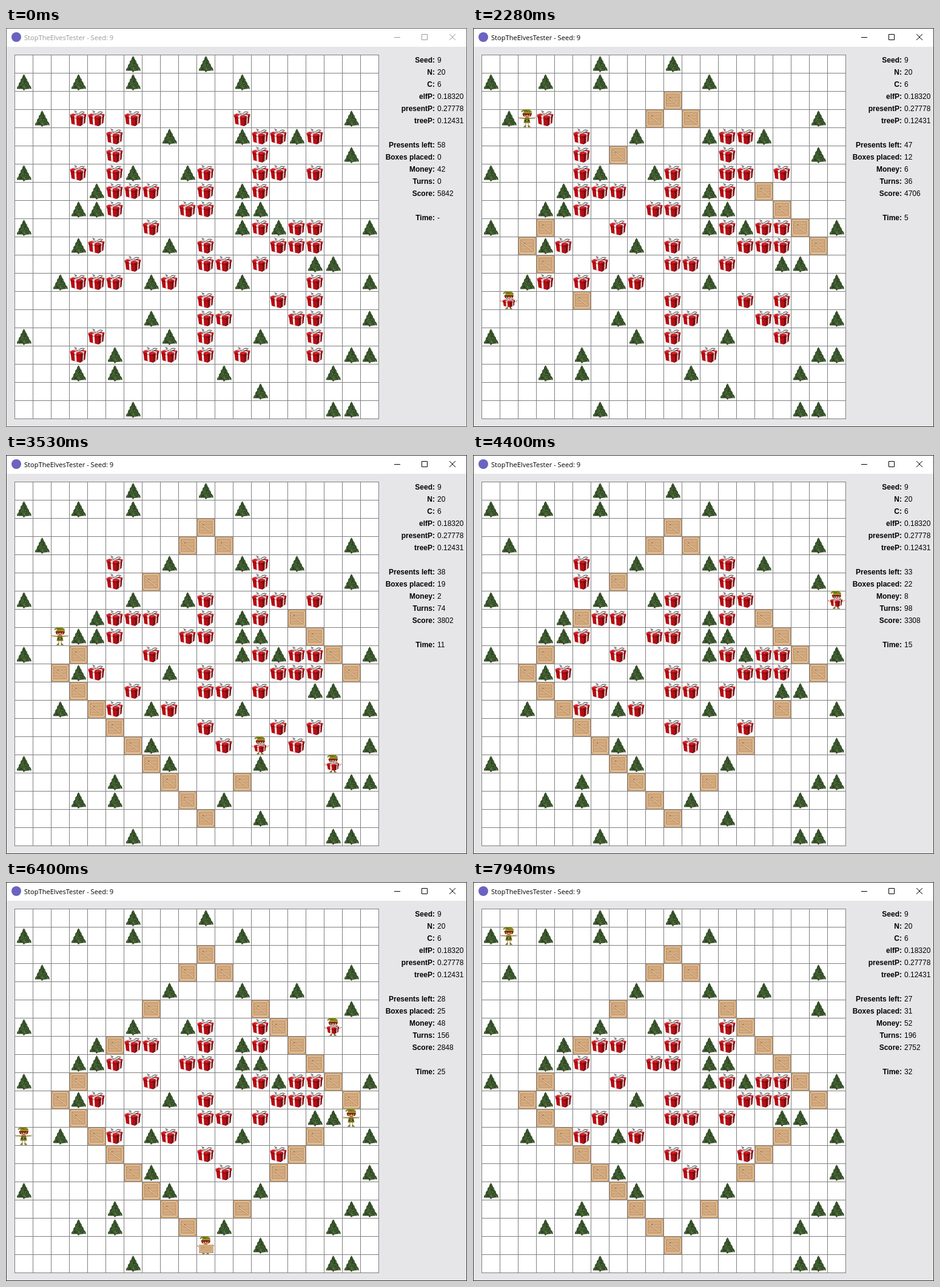
An HTML page with a canvas that plays this animation: 760x658 px, repeating every 7.99 s.

```html
<!DOCTYPE html>
<html lang="en">
<head>
<meta charset="utf-8">
<title>StopTheElvesTester</title>
<style>
  html, body { margin: 0; width: 760px; height: 658px; overflow: hidden; background: #e6e6e8; }
  svg, canvas { position: absolute; left: 0; top: 0; }
  #board { left: 14px; top: 44px; }
  #window { --ink: #999; --edge: #666; }
  #window.waking { --ink: #555; --edge: #4a4a4a; }
  #window.active { --ink: #000; --edge: #383838; }
  .title { font: 11.1px "Open Sans", sans-serif; fill: var(--ink); }
  .buttons { stroke: var(--ink); fill: none; }
  .edge { stroke: var(--edge); fill: none; }
  #panel { font: 12px "Liberation Sans", Arial, sans-serif; }
  .label { font-weight: bold; text-anchor: end; }
</style>
</head>
<body>
<svg id="window" width="760" height="658">
  <rect width="760" height="31" fill="#fff"/>
  <rect class="edge" x=".5" y=".5" width="759" height="657"/>
  <circle cx="17" cy="15" r="8" fill="#6a63c0"/>
  <text class="title" x="30" y="20">StopTheElvesTester - Seed: 9</text>
  <g class="buttons">
    <path d="M640 15.5h10M685.5 10.5h9v9h-9z"/>
    <path d="M731 10l10 10M741 10l-10 10"/>
  </g>
  <g id="panel"></g>
</svg>
<canvas id="board" width="601" height="601"></canvas>
<svg width="760" height="658">
  <path id="cursor" d="M.5.5V16.5L4.2 13 6.6 18.5 9 17.5 6.6 12H11.5Z" fill="#fff" stroke="#000"/>
</svg>
<script>
const N = 20, CELL = 30, LOOP = 7990;

const MAP = [
  "......T...T.........",
  "T..T..T.....T.......",
  "....................",
  ".T.PP.P.....P.....T.",
  ".....P..T...TPPTP...",
  ".....P.......P....T.",
  "T..P.PT..TP..PP.P...",
  "....TPPP..P.TP......",
  "...TTP...PP.TT......",
  "T......P....TPTPP..T",
  "...TP...T.P...PPP...",
  "......P...PP.P..TT..",
  "..TPPP.TP...T...P..T",
  "..........P...P.P...",
  ".......T..PP...PP..T",
  "T...P...T.P..T..P...",
  "...P.T.PP.P.P...P.TT",
  "...T.T.....T.....T..",
  ".............T......",
  "......T..........TT.",
].join("");

// turn placed, column, row
const CRATES = [
  [1, 10, 2], [2, 9, 3], [3, 11, 3], [4, 7, 5], [5, 15, 7], [6, 16, 8], [7, 17, 9], [8, 18, 10], [12, 3, 9],
  [18, 3, 11], [24, 2, 10], [30, 5, 13],
  [37, 6, 14], [42, 7, 15], [48, 8, 16], [54, 12, 16], [60, 4, 12], [66, 9, 17], [72, 10, 18],
  [83, 5, 7], [88, 16, 12], [96, 14, 14], [101, 15, 13],
  [145, 13, 5], [155, 14, 6],
].map(([turn, x, y]) => ({ turn, cell: at(x, y) }));

// ms, turn, elapsed seconds
const PACE = [
  [1030, 1, 0], [1480, 14, 2], [2280, 36, 5], [3530, 74, 11],
  [5280, 124, 20], [6400, 156, 25], [7940, 196, 32], [9480, 236, 39],
];
const FRAME = 45.7;

function at(x, y) { return y * N + x; }

const cells = [...MAP].map((_, i) => i);
const isEdge = c => c < N || c >= N * (N - 1) || c % N === 0 || c % N === N - 1;
const neighbours = c => [
  c % N < N - 1 ? c + 1 : -1, c + N, c % N ? c - 1 : -1, c - N,
].filter(n => n >= 0 && n < N * N);

// Shortest walk to a cell, or to the nearest edge when no goal is given
function walk(from, goal, free) {
  const open = c => c === from || c === goal || free(c);
  const queue = cells.filter(c => goal === undefined ? isEdge(c) && open(c) : c === goal);
  const dist = {};
  queue.forEach(c => dist[c] = 0);
  for (const c of queue) {
    for (const n of neighbours(c)) {
      if (n in dist || !open(n)) continue;
      dist[n] = dist[c] + 1;
      queue.push(n);
    }
  }
  const path = [from];
  for (let c = from; dist[c] > 0;) {
    c = neighbours(c).find(n => dist[n] === dist[c] - 1);
    path.push(c);
  }
  return path;
}

const elves = [];

// An elf stands on `via` (or on its target) at the given turn
function elf(turn, target, via = target, out) {
  target = at(...target);
  via = at(...via);
  const taken = new Set(elves.map(e => e.target));
  const free = c => MAP[c] !== "T" && !(MAP[c] === "P" && !taken.has(c))
    && !CRATES.some(k => k.cell === c && k.turn <= turn);
  const enter = walk(via, undefined, free).reverse();
  const reach = walk(via, target, free);
  const leave = out
    ? [...walk(target, at(...out), free), ...walk(at(...out), undefined, free).slice(1)]
    : walk(target, undefined, free);
  const path = [...enter, ...reach.slice(1), ...leave.slice(1)];
  const start = turn - enter.length + 1;
  elves.push({
    target, path, start,
    grab: turn + reach.length - 1,
    gone: start + path.length,
    gift: MAP[target] === "P" && !taken.has(target),
  });
}

elf(6, [6, 3]);
elf(6, [16, 12]);
elf(12, [3, 16]);
elf(13, [16, 16]);
elf(14, [4, 15]);
elf(14, [8, 16]);
elf(14, [7, 16], [6, 18]);
elf(14, [16, 4], [17, 1]);
elf(20, [3, 6]);
elf(24, [4, 3]);
elf(26, [12, 3]);
elf(32, [4, 12]);
elf(36, [3, 3], [2, 3]);
elf(42, [12, 16]);
elf(44, [10, 16]);
elf(45, [14, 4]);
elf(46, [3, 12]);
elf(50, [16, 15]);
elf(52, [5, 6]);
elf(55, [10, 15]);
elf(69, [10, 14], undefined, [13, 14]);
elf(72, [16, 14], undefined, [17, 15]);
elf(74, [5, 7], [2, 8]);
elf(84, [16, 13]);
elf(92, [15, 14]);
elf(95, [16, 6]);
elf(106, [5, 4]);
elf(113, [5, 5]);
elf(120, [13, 4], [0, 2], [16, 4]);
elf(120, [13, 5], [0, 5], [16, 5]);
elf(153, [14, 6]);
elf(156, [10, 18]);
elf(156, [18, 10], [18, 11]);
elf(156, [2, 10], [0, 12]);
elf(171, [12, 16]);
elf(176, [15, 13]);
elf(186, [10, 18]);
elf(196, [9, 3], [1, 1]);

// --- sprites, drawn on a 30 px cell ---
function bake(paint) {
  const canvas = document.createElement("canvas");
  canvas.width = canvas.height = CELL;
  paint(canvas.getContext("2d"));
  return canvas;
}
function fill(g, color, d) {
  g.fillStyle = color;
  g.fill(new Path2D(d));
}
function line(g, color, width, d) {
  g.strokeStyle = color;
  g.lineWidth = width;
  g.stroke(new Path2D(d));
}

const tree = bake(g => {
  let seed = 7;
  const rnd = () => (seed = seed * 16807 % 2147483647) / 2147483647;
  fill(g, "#5b4630", "M14 24h3v4.5h-3z");
  fill(g, "#36512a", "M15.5 2L18 6 18.500 8 21 11 21 13 24 17 24 19 27 22.500 28 26 22 26.500 18 27 12 26.500 4 26.500 4 24 7 20 7 17.500 10 14 10 11 13 8 13 6Z");
  const tones = ["#1f3517", "#28401d", "#4b6a38", "#5d7c45", "#76925c"];
  for (let i = 0; i < 95; i++) {
    const y = 4 + 21 * Math.sqrt(rnd());
    const x = 15.700 + (rnd() * 2 - 1) * (y - 2) * .46;
    const lean = (x - 15.700) * .15;
    line(g, tones[i % 5], .8, `M${x} ${y}l${lean} 1.700`);
  }
});

const gift = bake(g => {
  fill(g, "#b80c12", "M2.500 12L18.500 15.500 18.500 28 4 24Z");
  fill(g, "#86080d", "M18.500 15.500L27.500 11 26.500 22.500 18.500 28Z");
  fill(g, "#cc1a20", "M1.500 9L10 5.500 28.500 8 19 13Z");
  fill(g, "#c41017", "M1.500 9L19 13 19 16.500 2 12.500Z");
  fill(g, "#9c0b10", "M19 13L28.500 8 28 11.500 19 16.500Z");
  fill(g, "#f4f0f0", "M8.500 10.500L11.800 11.300 12.500 26.300 9.500 25.400Z");
  fill(g, "#e2d8d8", "M22.800 11L25 9.800 24.200 24 22.300 25.400Z");
  fill(g, "#f2eeee", "M8.500 10.600L19.500 6.500 22 7 11.800 11.300ZM6 7.300L8.500 6.200 25 9.800 22.800 11Z");
  line(g, "#570508", .6, "M2 12.700L18.800 16.500 28 11.700M18.700 13v15");
  fill(g, "#f5f5f5", "M15 8C9 8 7 4 9 2.800 11.500 1.500 14 4 15.500 7 17 3 22 1 25 2.500 26.500 5 21 8.500 15 8Z");
  line(g, "#222", .9, "M15 8C10 7 9.500 4.500 11 4M16 7.500C18 4.500 22 3.500 24 4.500M17 8.500C20 8.500 24 7 25.500 4M8.500 2.500L13 4.500");
  line(g, "#777", .7, "M15 8L12 10M16 8L20 10");
});

const crate = bake(g => {
  fill(g, "#d4ab80", "M1 1h29v29h-29z");
  line(g, "#c3966a", .7, "M4 10.500h23M4 15.500h23M4 20.500h23");
  fill(g, "#dfbb92", "M1 1h29v4h-29zM1 25h29v5h-29zM1 5h3.500v20h-3.500zM26 5h4v20h-4z");
  line(g, "#dcb78c", 3.500, "M5.500 8L25.500 23");
  line(g, "#b3865c", .8, "M5 6.500L26 22M4.500 9.500L24 24.500M4.500 5h21.500v20h-21.500z");
  line(g, "#bd9268", 1, "M1.500 1.500h28v28h-28z");
  fill(g, "#8c643f", "M10 10h2v1.500h-2zM2.200 2.500h1v1h-1zM27.500 2.500h1v1h-1zM2.200 27h1v1h-1zM27.500 27h1v1h-1z");
});

function paintElf(g, loot) {
  const skin = "#dc9f70", olive = "#777b20";
  line(g, skin, 1.500, "M13 22L12.500 27M17 22L17.500 27");
  fill(g, "#6a6c1a", "M13.500 26v3.500h-4.500l1-1.500zM16.500 26v3.500h4.500l-1-1.500z");
  line(g, olive, 1.700, loot ? "M12 15L5 18M18 15L25 18" : "M12 15L4 14.500M18 15L26 14.500");
  line(g, skin, 1.500, loot ? "M1 15L4 18M29 15L26 18" : "M1 13.500L4 14.500M29 13.500L26 14.500M2 16L4 14.500M28 16L26 14.500");
  fill(g, "#697020", "M11.500 13.500h7l2 9h-11z");
  fill(g, "#3c3210", "M10.800 18h8.400v1.500h-8.400z");
  fill(g, "#cdb333", "M14 18h2v1.500h-2z");
  fill(g, "#8d1c16", "M7.500 8C8 3.500 22.500 3.500 23 8L21 12H9.500Z");
  fill(g, skin, "M10.500 8.500C12 6.500 18.500 6.500 20 8.500 20 12 18 14.500 15.200 14.500 12.500 14.500 10.500 12 10.500 8.500Z");
  fill(g, "#7c1512", "M9.500 6.500L21.500 6.500 19 9 11 9Z");
  fill(g, "#241510", "M12.300 9.300h1.600v1.400h-1.600zM16.500 9.300h1.600v1.400h-1.600z");
  fill(g, "#b63232", "M13.200 12.200h4v1h-4z");
  fill(g, "#83841f", "M5.500 3L9 .5 18 0 22.500 3 23 6.500 9 6.500 10 3 6 5Z");
  line(g, "#b9ad39", 1, "M9 6L23 6");
  line(g, "#4d5216", .8, "M11 2L16 3.500");
  if (loot === gift) g.drawImage(gift, 3.500, 9.500, 23, 18.500);
  if (loot === crate) g.drawImage(crate, 3.500, 13.500, 24, 14);
}
const freeElf = bake(g => paintElf(g));
const giftElf = bake(g => paintElf(g, gift));
const crateElf = bake(g => paintElf(g, crate));

// --- side panel ---
const panel = document.getElementById("panel");
function text(x, y, content, cls) {
  const node = document.createElementNS("http://www.w3.org/2000/svg", "text");
  node.setAttribute("x", x);
  node.setAttribute("y", y);
  if (cls) node.setAttribute("class", cls);
  node.textContent = content;
  return panel.appendChild(node);
}
const values = {};
[
  ["Seed", "9"], ["N", "20"], ["C", "6"], ["elfP", "0.18320"], ["presentP", "0.27778"], ["treeP", "0.12431"], null,
  ["Presents left"], ["Boxes placed"], ["Money"], ["Turns"], ["Score"], null, ["Time"],
].forEach((row, i) => {
  if (!row) return;
  text(707, 57 + 20 * i, row[0] + ":", "label");
  values[row[0]] = text(711, 57 + 20 * i, row[1] || "");
});

// --- scene ---
const ctx = document.getElementById("board").getContext("2d");
const frame = document.getElementById("window");
const cursor = document.getElementById("cursor");

function drawBoard(turn) {
  const put = (sprite, c) => ctx.drawImage(sprite, c % N * CELL, Math.floor(c / N) * CELL);
  ctx.fillStyle = "#fff";
  ctx.fillRect(0, 0, 601, 601);
  ctx.fillStyle = "#808080";
  for (let i = 0; i <= N; i++) {
    ctx.fillRect(i * CELL, 0, 1, 601);
    ctx.fillRect(0, i * CELL, 601, 1);
  }
  const grabbed = elves.filter(e => e.grab <= turn);
  cells.forEach(c => {
    if (MAP[c] === "T") put(tree, c);
    if (MAP[c] === "P" && !grabbed.some(e => e.gift && e.target === c)) put(gift, c);
  });
  CRATES.forEach(k => {
    const stolen = grabbed.some(e => !e.gift && e.target === k.cell && turn < e.grab + 2);
    if (k.turn <= turn && !stolen) put(crate, k.cell);
  });
  elves.forEach(e => {
    if (turn < e.start || turn >= e.gone) return;
    put(turn < e.grab ? freeElf : e.gift ? giftElf : crateElf, e.path[turn - e.start]);
  });
}

function drawPanel(turn, seconds) {
  const left = 58 - elves.filter(e => e.gift && e.gone <= turn).length;
  const placed = CRATES.filter(k => k.turn <= turn).length
    + elves.filter(e => !e.gift && e.grab + 2 <= turn).length;
  const money = 42 + turn - 6 * placed;
  values["Presents left"].textContent = left;
  values["Boxes placed"].textContent = placed;
  values.Money.textContent = money;
  values.Turns.textContent = turn;
  values.Score.textContent = left * 100 + money;
  values.Time.textContent = turn ? seconds : "-";
}

function progress(t) {
  if (t < PACE[0][0]) return [0, 0];
  const i = PACE.findIndex(p => p[0] > t) - 1;
  const [t0, turn0, s0] = PACE[i], [t1, turn1, s1] = PACE[i + 1];
  const steps = Math.round((t1 - t0) / FRAME);
  const f = Math.floor((t - t0) / (t1 - t0) * steps) / steps;
  return [Math.round(turn0 + (turn1 - turn0) * f), Math.floor(s0 + (s1 - s0) * f)];
}

let shown;
function render() {
  const t = performance.now() % LOOP;
  frame.setAttribute("class", t < 260 ? "" : t < 350 ? "waking" : "active");
  cursor.style.display = t >= 30 && t < 880 ? "" : "none";
  cursor.setAttribute("transform", t < 830 ? "translate(714 599)" : "translate(743 605)");
  const [turn, seconds] = progress(t);
  if (shown !== turn + ":" + seconds) {
    shown = turn + ":" + seconds;
    drawBoard(turn);
    drawPanel(turn, seconds);
  }
  requestAnimationFrame(render);
}
render();
</script>
</body>
</html>
```
